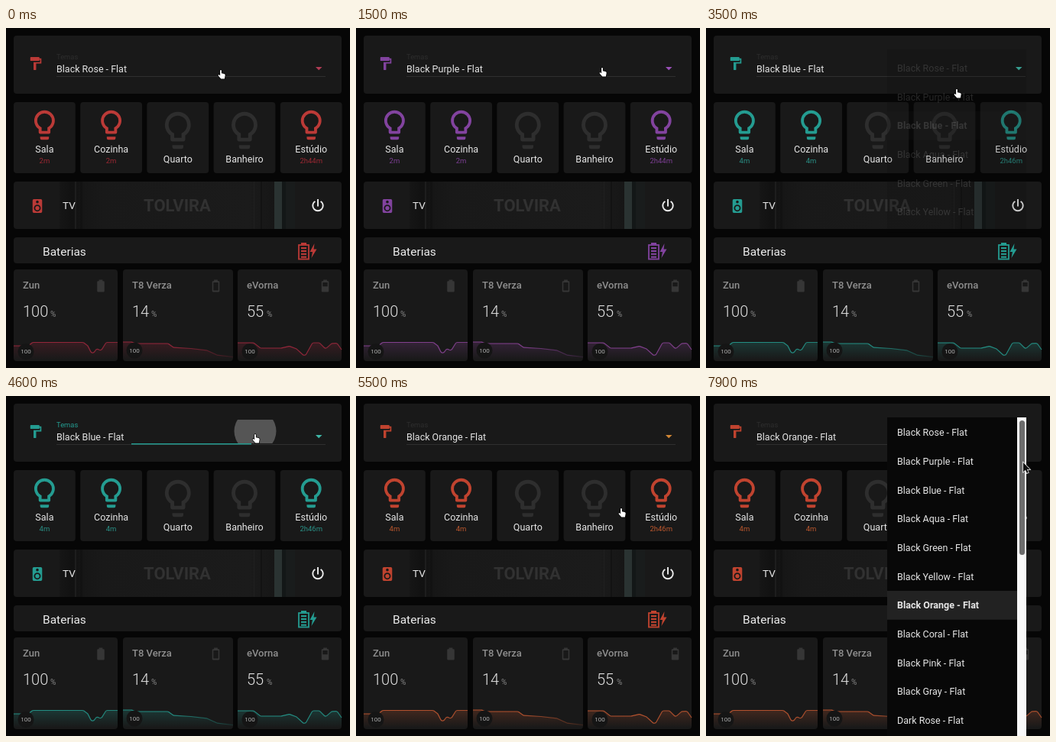
Write an HTML page with a canvas that moves like this. It is 450 by 445 pixels and loops after 8 s.

```html
<!DOCTYPE html>
<html lang="pt">
<head>
<meta charset="utf-8">
<title>Painel de temas</title>
<style>
  html, body { margin: 0; width: 100%; height: 100%; overflow: hidden; background: #060606; }
  canvas { display: block; }
</style>
</head>
<body>
<canvas id="stage" width="450" height="445"></canvas>
<script>
const ctx = document.getElementById('stage').getContext('2d');
const LOOP = 8000;
const SANS = 'Roboto, sans-serif';
const CARD = '#191919';

const themes = {
  Rose:   { icon: '#bb3a37', line: '#94263a', time: '#9c2833', arrow: '#b03c55' },
  Purple: { icon: '#82439f', line: '#83408f', time: '#7d3f94', arrow: '#9a50b8' },
  Blue:   { icon: '#249c91', line: '#238f84', time: '#2a9187', arrow: '#3fb8a8' },
  Orange: { icon: '#c0432f', line: '#b5522e', time: '#bd582e', arrow: '#d28735' }
};
const options = ['Black Rose', 'Black Purple', 'Black Blue', 'Black Aqua', 'Black Green',
  'Black Yellow', 'Black Orange', 'Black Coral', 'Black Pink', 'Black Gray', 'Dark Rose'];

const icons = {
  bulb: 'M12,2A7,7 0 0,1 19,9C19,11.38 17.81,13.47 16,14.74V17A1,1 0 0,1 15,18H9A1,1 0 0,1 8,17V14.74C6.19,13.47 5,11.38 5,9A7,7 0 0,1 12,2M9,21V20H15V21A1,1 0 0,1 14,22H10A1,1 0 0,1 9,21M12,4A5,5 0 0,0 7,9C7,11.05 8.23,12.81 10,13.58V16H14V13.58C15.77,12.81 17,11.05 17,9A5,5 0 0,0 12,4Z',
  roller: 'M18,4V3A1,1 0 0,0 17,2H5A1,1 0 0,0 4,3V7A1,1 0 0,0 5,8H17A1,1 0 0,0 18,7V6H19V10H9V21A1,1 0 0,0 10,22H12A1,1 0 0,0 13,21V12H21V4H18Z',
  speaker: 'M7,2H17A2,2 0 0,1 19,4V20A2,2 0 0,1 17,22H7A2,2 0 0,1 5,20V4A2,2 0 0,1 7,2ZM14,6A2,2 0 1,0 10,6A2,2 0 1,0 14,6ZM17,15A5,5 0 1,0 7,15A5,5 0 1,0 17,15ZM15,15A3,3 0 1,0 9,15A3,3 0 1,0 15,15Z',
  power: 'M16.56,5.44L15.11,6.89C16.84,7.94 18,9.83 18,12A6,6 0 0,1 12,18A6,6 0 0,1 6,12C6,9.83 7.16,7.94 8.88,6.88L7.44,5.44C5.36,6.88 4,9.28 4,12A8,8 0 0,0 12,20A8,8 0 0,0 20,12C20,9.28 18.64,6.88 16.56,5.44M13,3H11V13H13Z',
  battery: 'M16.67,4H15V2H9V4H7.33A1.33,1.33 0 0,0 6,5.33V20.67C6,21.4 6.6,22 7.33,22H16.67A1.33,1.33 0 0,0 18,20.67V5.33C18,4.6 17.4,4 16.67,4Z',
  hand: 'M2.6,1C2.6,-0.3 4.4,-0.3 4.4,1V4.2L8,5Q9.4,5.4 9.2,6.8L8.4,11.6H3.8L0.2,7.4Q-0.2,6.2 1,6L2.6,7.2Z',
  arrow: 'M0,0V12.5L2.9,9.8L4.8,14L6.8,13.1L4.9,9H8.8Z'
};
for (const name in icons) icons[name] = new Path2D(icons[name]);

// Each step holds until the next one starts.
const steps = [
  { at: 0,    theme: 'Rose',   cursor: [281, 55] },
  { at: 100,  theme: 'Rose',   cursor: [281, 55], ripple: true },
  { at: 200,  theme: 'Rose',   cursor: [282, 56], menu: 0.5, hover: 0 },
  { at: 300,  theme: 'Rose',   cursor: [284, 58], menu: 0.93, hover: 0 },
  { at: 800,  theme: 'Rose',   cursor: [339, 86], menu: 1, hover: 1, bar: true, ring: true },
  { at: 1300, theme: 'Rose',   cursor: [338, 84], menu: 0.6, hover: 1 },
  { at: 1400, theme: 'Purple', cursor: [331, 68], menu: 0.15, hover: 1 },
  { at: 1500, theme: 'Purple', cursor: [322, 52] },
  { at: 2500, theme: 'Purple', cursor: [322, 52], ripple: true },
  { at: 2600, theme: 'Purple', cursor: [325, 84], menu: 0.5, hover: 1 },
  { at: 2700, theme: 'Purple', cursor: [332, 125], menu: 0.93, hover: 1 },
  { at: 2800, theme: 'Purple', cursor: [332, 125], menu: 1, hover: 2, bar: true },
  { at: 2900, theme: 'Purple', cursor: [332, 125], menu: 1, hover: 2, bar: true, ring: true },
  { at: 3400, theme: 'Purple', cursor: [331, 118], menu: 0.6, hover: 2 },
  { at: 3500, theme: 'Blue',   cursor: [328, 80], menu: 0.15, hover: 2 },
  { at: 3600, theme: 'Blue',   cursor: [326, 50] },
  { at: 4600, theme: 'Blue',   cursor: [326, 50], ripple: true },
  { at: 4700, theme: 'Blue',   cursor: [328, 80], menu: 0.5, hover: 2 },
  { at: 4800, theme: 'Blue',   cursor: [333, 150], menu: 0.93, hover: 2 },
  { at: 4900, theme: 'Blue',   cursor: [338, 230], menu: 1, hover: 5, bar: true },
  { at: 5000, theme: 'Blue',   cursor: [340, 275], menu: 1, hover: 6, bar: true, ring: true },
  { at: 5500, theme: 'Orange', cursor: [347, 147] },
  { at: 7500, theme: 'Orange', cursor: [372, 52], ripple: true },
  { at: 7600, theme: 'Orange', cursor: [382, 58], menu: 0.5, hover: 6 },
  { at: 7700, theme: 'Orange', cursor: [396, 68], menu: 0.93, hover: 6 },
  { at: 7800, theme: 'Orange', cursor: [410, 80], menu: 1, hover: 6, bar: true },
  { at: 7900, theme: 'Orange', cursor: [415, 87], menu: 1, hover: 6, bar: true, drag: true }
];

function text(str, x, cy, size, color, { weight = 400, align = 'left' } = {}) {
  ctx.font = `${weight} ${size}px ${SANS}`;
  ctx.textAlign = align;
  ctx.fillStyle = color;
  ctx.fillText(str, x, cy + size * 0.355);
}

function box(x, y, w, h, color, r = 0) {
  ctx.fillStyle = color;
  ctx.beginPath();
  ctx.roundRect(x, y, w, h, r);
  ctx.fill();
}

function disc(x, y, r, color) {
  ctx.fillStyle = color;
  ctx.beginPath();
  ctx.arc(x, y, r, 0, Math.PI * 2);
  ctx.fill();
}

// Icons live in a 24-unit square centred on (cx, cy).
function icon(name, cx, cy, size, color) {
  ctx.save();
  ctx.translate(cx - size / 2, cy - size / 2);
  ctx.scale(size / 24, size / 24);
  ctx.fillStyle = color;
  ctx.fill(icons[name], 'evenodd');
  ctx.restore();
}

function poly(points, color) {
  ctx.fillStyle = color;
  ctx.beginPath();
  points.forEach(([x, y]) => ctx.lineTo(x, y));
  ctx.fill();
}

function header(s, theme) {
  box(10, 10, 429, 76, CARD, 4);
  icon('roller', 38.6, 46.5, 20.5, theme.icon);
  text('Temas', 66, 37.5, 9.4, s.ripple ? theme.icon : '#2e2e2e');
  text(`Black ${s.theme} - Flat`, 66, 53.4, 12.5, '#e4e4e4');
  box(66, 63, 352, 1, '#2f2f2f');
  poly([[405, 51], [413.5, 51], [409.2, 55.3]], theme.arrow);
  if (!s.ripple) return;
  box(164, 62, 157, 1.4, theme.icon);
  ctx.save();
  ctx.beginPath();
  ctx.rect(66, 31, 352, 31);
  ctx.clip();
  disc(s.cursor[0], 46, 27.5, 'rgba(255,255,255,0.26)');
  ctx.restore();
}

function lights(theme, late) {
  const rooms = [
    ['Sala', late ? '4m' : '2m'], ['Cozinha', late ? '4m' : '2m'],
    ['Quarto'], ['Banheiro'], ['Estúdio', late ? '2h46m' : '2h44m']
  ];
  rooms.forEach(([name, time], i) => {
    const x = 10 + i * 87.2, cx = x + 40.4;
    box(x, 97, 80.8, 93, CARD, 4);
    icon('bulb', cx, time ? 127 : 134, time ? 46 : 58, time ? theme.icon : '#2e2e2e');
    text(name, cx, time ? 159 : 171.5, 12.5, '#e6e6e6', { align: 'center' });
    if (time) text(time, cx, 173.5, 9.5, theme.time, { align: 'center' });
  });
}

function television(theme) {
  box(10, 201, 429, 62, CARD, 4);
  const shade = ctx.createLinearGradient(70, 0, 351, 0);
  [[0, '#161616'], [0.06, '#111'], [0.11, '#161616'], [0.2, '#191919'], [0.88, '#1b1b1b'], [1, '#161616']]
    .forEach(([p, c]) => shade.addColorStop(p, c));
  box(70, 201, 281, 62, shade);
  box(90, 201, 2, 62, '#1d1d1d');
  box(97, 201, 3, 62, '#121212');
  box(324, 201, 1, 62, '#202020');
  box(333, 201, 2, 62, '#131313');
  box(351, 201, 10, 62, '#2a3332');
  box(361, 201, 5, 62, '#131717');
  box(366, 201, 12, 62, '#191c1c');
  text('TOLVIRA', 224, 232, 22, '#313131', { weight: 700, align: 'center' });
  icon('speaker', 41, 233, 21.5, theme.icon);
  text('TV', 74, 232.5, 13.5, '#e8e8e8');
  icon('power', 408, 232.5, 23, '#ececec');
}

function batteryTitle(theme) {
  box(10, 274, 429, 34, CARD, 4);
  text('Baterias', 48, 292.3, 15.5, '#ececec');
  box(386, 281, 7, 3, theme.icon);
  ctx.strokeStyle = theme.icon;
  ctx.lineWidth = 1.8;
  ctx.strokeRect(383, 284, 13, 18.5);
  for (let i = 0; i < 4; i++) box(386, 287 + i * 3.9, 7, 2.1, theme.icon);
  poly([[403.5, 282], [397.5, 293], [401, 293], [399.5, 301], [406.5, 289.5], [402.5, 289.5]], theme.icon);
}

const devices = [
  { name: 'Zun', level: '100', x: 10, w: 136, tx: 22, unit: 58, bat: 124, fill: 1, badge: [26, 423.5],
    curve: [[10, 416], [29, 416], [35, 411.5], [101, 411.5], [107, 416], [113, 428], [119, 419], [124, 423], [131, 411.5], [146, 411.5]] },
  { name: 'T8 Verza', level: '14', x: 153, w: 144, tx: 165, unit: 190, bat: 274.5, fill: 0, badge: [168, 422],
    curve: [[153, 411], [164, 411], [170, 413], [212, 413], [219, 418], [242, 419.5], [263, 422], [276, 428], [297, 430.5]] },
  { name: 'eVorna', level: '55', x: 303, w: 136, tx: 315, unit: 341, bat: 417.5, fill: 0.5, badge: [319, 423.5],
    curve: [[303, 412], [324, 412], [333, 419], [360, 419], [371, 416.5], [380, 420], [391, 430], [401, 412], [410, 412], [418, 420], [426, 413], [433, 412.5], [439, 421]] }
];

function trace(points) {
  ctx.beginPath();
  ctx.moveTo(...points[0]);
  for (let i = 1; i < points.length - 1; i++) ctx.arcTo(...points[i], ...points[i + 1], 3);
  ctx.lineTo(...points[points.length - 1]);
}

function chart(d, theme) {
  const area = ctx.createLinearGradient(0, 409, 0, 434);
  area.addColorStop(0, theme.line + '48');
  area.addColorStop(1, theme.line + '00');
  trace(d.curve);
  ctx.lineTo(d.x + d.w, 436);
  ctx.lineTo(d.x, 436);
  ctx.fillStyle = area;
  ctx.fill();
  const stroke = ctx.createLinearGradient(d.x, 0, d.x + d.w, 0);
  stroke.addColorStop(0, theme.line);
  stroke.addColorStop(0.4, theme.line);
  stroke.addColorStop(1, theme.line + (d.fill ? 'e0' : '30'));
  trace(d.curve);
  ctx.strokeStyle = stroke;
  ctx.lineWidth = 1.2;
  ctx.stroke();
  disc(...d.badge, 10.5, '#151515');
  text('100', d.badge[0], d.badge[1], 8, '#b0b0b0', { align: 'center' });
}

function device(d, theme) {
  box(d.x, 316, d.w, 120, CARD, 4);
  text(d.name, d.tx, 336, 13, '#8f8f8f', { weight: 500 });
  text(d.level, d.tx, 371, 20, '#e2e2e2', { weight: 300 });
  text('%', d.unit, 374, 10, '#858585');
  icon('battery', d.bat, 337.5, 19, '#363636');
  if (d.fill < 1) box(d.bat - 3.2, 333, 6.4, 10.5 * (1 - d.fill), CARD);
  chart(d, theme);
}

function menu(s) {
  const rowH = 37.67, scroll = s.drag ? 4.6 : 0;
  const height = s.menu < 0.9 ? 417 * (0.5 + s.menu / 2) : 417;
  ctx.save();
  ctx.globalAlpha = s.menu;
  ctx.beginPath();
  ctx.rect(237, 28, 182, height);
  ctx.clip();
  box(237, 28, 182, 417, '#080808');
  options.forEach((name, i) => {
    const cy = 52.5 + i * rowH - scroll;
    if (i === s.hover) box(237, cy - rowH / 2, 182, rowH, '#222');
    const weight = name === 'Black ' + s.theme ? 700 : 400;
    text(name + ' - Flat', 250, cy, 12.5, '#e6e6e6', { weight });
  });
  if (s.bar) {
    box(407, 28, 12, 417, '#f8f8f8');
    if (s.drag) box(410, 32, 7, 176, '#6c6c6c', 3.5);
    else box(410, 30, 7, 168, '#bdbdbd', 3.5);
  }
  ctx.restore();
}

function pointer(s) {
  const [x, y] = s.cursor;
  if (s.ring) {
    ctx.strokeStyle = '#e8e8e8';
    ctx.lineWidth = 1.2;
    for (const r of [24, 21]) {
      ctx.beginPath();
      ctx.arc(x, y + 1, r, 0, Math.PI * 2);
      ctx.stroke();
    }
  }
  const shape = s.drag ? icons.arrow : icons.hand;
  ctx.save();
  ctx.translate(s.drag ? x : x - 3.5, y);
  ctx.lineWidth = 1.4;
  ctx.strokeStyle = s.drag ? '#fff' : '#000';
  ctx.fillStyle = s.drag ? '#111' : '#fff';
  ctx.stroke(shape);
  ctx.fill(shape);
  ctx.restore();
}

function draw(t) {
  const s = steps.findLast(step => step.at <= t);
  const theme = themes[s.theme];
  box(0, 0, 450, 445, '#060606');
  header(s, theme);
  lights(theme, t >= 2600);
  television(theme);
  batteryTitle(theme);
  devices.forEach(d => device(d, theme));
  if (s.menu) menu(s);
  pointer(s);
}

const start = performance.now();
function tick() {
  draw((performance.now() - start) % LOOP);
  requestAnimationFrame(tick);
}
tick();
</script>
</body>
</html>
```
